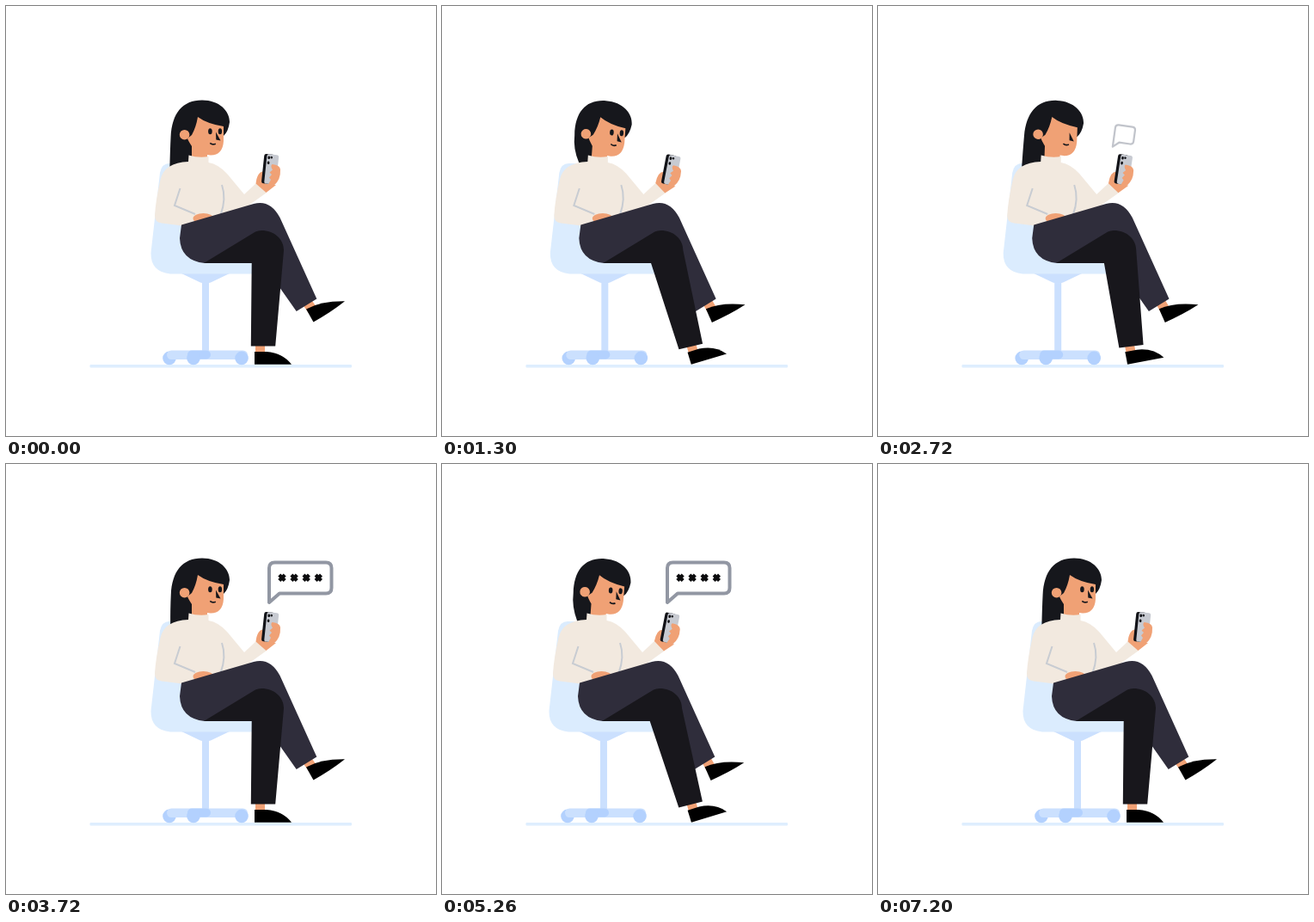
Recreate the animation shown at these times as an HTML page. Size 500 px wide and 500 px high, loop 7220 ms.

```html
<!DOCTYPE html>
<html lang="en">
<head>
<meta charset="utf-8">
<title>Waiting for a reply</title>
<style>
  html, body { margin: 0; width: 100%; height: 100%; overflow: hidden; background: #fff; }
  svg { display: block; width: 100%; height: 100%; }
  .skin { fill: #f0a175; }
  .hair { fill: #16171c; }
  .seat { fill: #dbecfe; }
  .metal { fill: #cbe0fe; }
  .wheel { fill: #b3d1fe; }
  .shirt { fill: #f2e9df; }
  .navy { fill: #2f2d3b; }
  .dark { fill: #18171c; }
  .fold { fill: none; stroke: #c8ccd2; stroke-width: 2; }
</style>
</head>
<body>
<svg viewBox="0 0 500 500">
  <rect x="97.500" y="417" width="304.500" height="3.600" rx="1" fill="#deeefe"/>
  <g id="scene">
    <!-- chair -->
    <path class="metal" d="M228 311h8v92h-8z"/>
    <path class="metal" d="M204 311h56l-22 10.500q-6 2-12 0z"/>
    <circle class="wheel" cx="190" cy="409.400" r="7.800"/>
    <rect class="metal" x="187" y="400.500" width="94" height="10.500" rx="5.200"/>
    <rect class="wheel" x="211" y="400.500" width="27" height="10" rx="5"/>
    <circle class="wheel" cx="218" cy="409.400" r="7.800"/>
    <circle class="wheel" cx="274" cy="409.400" r="7.800"/>
    <path class="seat" d="M179 194Q181 183 190 183H225V298H294V311.500H191Q168 309 168.500 287Z"/>

    <g id="head">
      <path id="hair" class="hair"/>
      <path class="skin" d="M223 129Q234 137 253 140V157Q252 173.500 238 173.500L234 173V180H216V163Q212 157 211 154L216 150Q221 141 223 129Z"/>
      <circle class="skin" cx="207.600" cy="149.700" r="5.800"/>
      <g class="hair">
        <ellipse class="eye" cx="237.400" cy="145.800" rx="2.300" ry="3.500"/>
        <ellipse class="eye" cx="248.900" cy="145.800" rx="2.200" ry="3.500"/>
        <path d="M244 146.500L249.500 156.500L244.300 155.500Z"/>
      </g>
      <path d="M237.300 159.400Q240 162 243.800 160.200" fill="none" stroke="#15161b" stroke-width="1.700"/>
    </g>

    <!-- torso -->
    <path class="shirt" d="M212.500 173.500Q224 177 235.500 175V182Q247 184 257 195L277 219L291 206L303 217L275 237L250 262L205 255.500L181 252.500Q172.500 251 173 243.500Q174 226 179.500 202Q184 182 212 181Z"/>
    <path class="fold" d="M202.500 212L196 232L220 242M251 208Q256.500 224 249.500 243"/>
    <ellipse class="skin" cx="229.500" cy="247" rx="12" ry="6"/>

    <g id="hand">
      <path class="skin" d="M290.500 206.500Q292 193 299 192.500L304 207L314 208Q309 212 302.500 217Z"/>
      <g transform="rotate(6 307 190)">
        <rect x="298.600" y="172.500" width="12" height="34.500" rx="2.500" fill="#121318"/>
        <rect x="301.800" y="172.500" width="13.800" height="34.500" rx="2.500" fill="#c7cad1"/>
        <path d="M304.300 176v1M304.300 182v1M307.300 176v0" stroke="#121318" stroke-width="2.600" stroke-linecap="round"/>
      </g>
      <path class="skin" d="M309.500 184Q318.500 185 319 190Q319.500 202 312 208Q308 211 304 211L305.500 206.500L308 202L306 199.500L309 196L306.500 193.500L310 190.500Q307 186 309.500 184Z"/>
    </g>

    <!-- crossed leg -->
    <g id="toe">
      <path class="skin" d="M344 346L354 340L361 350L352 357Z"/>
      <path d="M349 352.500Q366 343 394 343.300Q378 356 357.500 367.500Z"/>
    </g>
    <path class="navy" d="M204 254.500L288 230Q307 224.500 318.500 246L361.300 340.500L337.700 355L318 327L293 285L231 299Q203 296 202 270Z"/>

    <!-- planted leg -->
    <g id="foot">
      <path class="skin" d="M290 388h11v16h-11z"/>
      <path d="M289 402H303Q322 403.500 332 416.800H289Z"/>
    </g>
    <path id="shin" class="dark"/>

    <g id="bubble">
      <path id="frame" fill="#fff" stroke="#9297a3" stroke-width="4" stroke-linejoin="round"/>
      <g id="marks" stroke="#0c0c0e" stroke-width="4.200"></g>
    </g>
  </g>
</svg>
<script>
  const LOOP = 7220, CYCLE = 3600, SHIFT = 44;
  const $ = id => document.getElementById(id);
  const set = (el, name, value) => el.setAttribute(name, value);
  const move = (el, value) => set(el, 'transform', value);

  function ease(t, start, span) {
    const u = Math.min(1, Math.max(0, (t - start) / span));
    return u * u * (3 - 2 * u);
  }

  const marks = [0, 1, 2, 3].map(() => {
    const x = document.createElementNS('http://www.w3.org/2000/svg', 'path');
    set(x, 'd', 'M-3.200-3.200L3.200 3.200M3.200-3.200L-3.200 3.200');
    $('marks').append(x);
    return x;
  });
  const eyes = document.querySelectorAll('.eye');

  function drawHead(c, p) {
    const q = (c + 150) % CYCLE;
    const sway = ease(q, 0, 1400) - ease(q, 1600, 1350);
    const tip = `${190 + 12 * sway} ${188 - 4 * sway}`;
    const side = 191.5 + 3 * sway;
    set($('hair'), 'd', `M${tip}Q${side - 0.8} 168 ${side} 152C193 125 205 109.600 228 109.600` +
      'C248 109.600 260 122 260 135Q258.500 146 253 151L230 140L218 160V178L212 187Z');
    move($('head'), `rotate(${4.2 * p} 222 184)`);

    const open = 1 - ease(c, 2610, 80) + ease(c, 2750, 80);
    eyes.forEach(eye => set(eye, 'ry', 3.5 * open));
  }

  function drawLegs(t, c, p) {
    const lag = 4 * p * (1 - p) * (c < 1800 ? -1 : 0.6);
    const angle = 14 * p * Math.PI / 180;
    const dx = 14.2 * Math.cos(angle), dy = 14.2 * Math.sin(angle);
    const x = 299 + 34.1 * p + lag, y = 395.5 + 0.5 * p;
    set($('shin'), 'd', `M230 299L290 262.500Q293 261 297 261C312 261 323 271 323 284` +
      `L${x + dx} ${y - dy}L${x - dx} ${y + dy}L285.700 299Z`);
    move($('foot'), `translate(${45 * p + lag} 0) rotate(${-17 * Math.pow(p, 0.7)} 289 417)`);

    const dip = ease(t, 240, 600) - ease(t, 2760, 600) + ease(t, 3840, 600) - ease(t, 5300, 900);
    move($('toe'), `rotate(${5.5 * dip} 353 358)`);
  }

  function drawBubble(t) {
    const size = ease(t, 2550, 315) - ease(t, 6800, 300);
    const wide = ease(t, 2840, 320) - ease(t, 6600, 240);
    const right = 347.5 + 31 * wide;
    set($('bubble'), 'opacity', size);
    move($('bubble'), `translate(${-24 * (1 - size)} ${6 * (1 - size)}) translate(306.500 161) ` +
      `rotate(${18 * (1 - size)}) scale(${size}) translate(-306.500 -161)`);
    set($('frame'), 'd', `M306 161V121Q306 114.500 312.500 114.500H${right - 6.5}` +
      `Q${right} 114.500 ${right} 121V144Q${right} 150.500 ${right - 6.5} 150.500H318Z`);
    marks.forEach((mark, i) => {
      const s = ease(t, 3040 + 120 * i, 140) - ease(t, 6660 - 50 * i, 120);
      move(mark, `translate(${321 + 14.1 * i} 132.300) scale(${s})`);
    });
  }

  function draw(now) {
    const t = now % LOOP, c = t % CYCLE;
    const p = ease(c, 225, 1200) - ease(c, 2105, 1260);
    move($('scene'), `translate(${-SHIFT * p} 0)`);
    move($('hand'), `rotate(${5 * p} 297 211)`);
    drawHead(c, p);
    drawLegs(t, c, p);
    drawBubble(t);
  }

  let begin;
  function tick(now) {
    begin ??= now;
    draw(now - begin);
    requestAnimationFrame(tick);
  }
  draw(0);
  requestAnimationFrame(tick);
</script>
</body>
</html>
```
